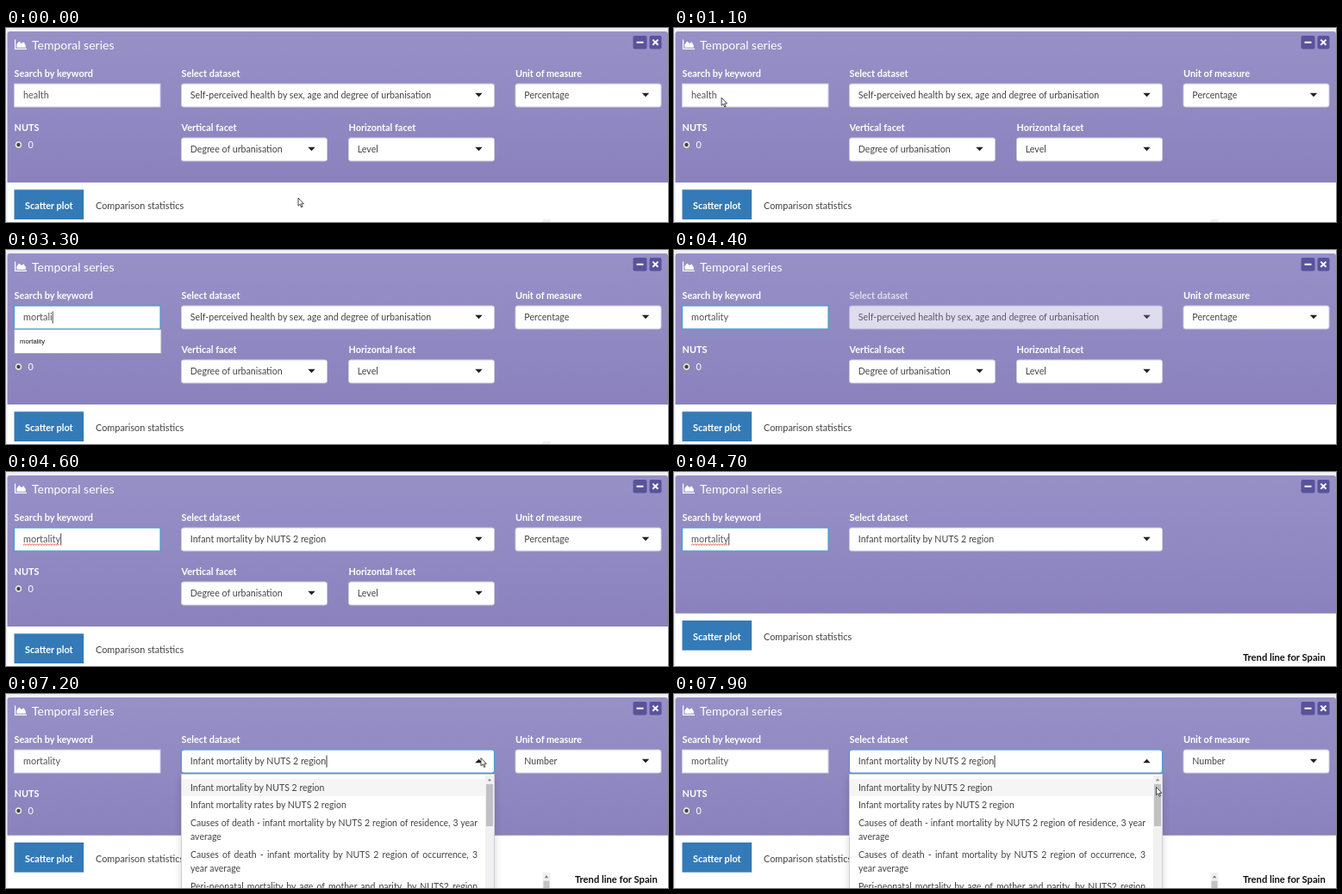
An HTML page that plays this animation: 768 px wide and 226 px high, repeating every 8 s.

```html
<!DOCTYPE html>
<html lang="en">
<head>
<meta charset="utf-8">
<title>Temporal series</title>
<style>
  html, body { margin: 0; width: 100%; height: 100%; overflow: hidden; background: #fff; }
  body { position: relative; }
  svg { position: absolute; left: 0; top: 0; width: 768px; height: 226px; overflow: hidden; }
  text { font: 10.9px Lato, "Open Sans", sans-serif; fill: #444; white-space: pre; }
  .label { fill: #fff; font-weight: 700; }
  .value { font-size: 10.65px; }
  .box { fill: #fff; stroke: #cdcbdc; }
  .focus { fill: #fff; stroke: #4b9bd3; stroke-width: 1.2; }
  .arrow { fill: #222; }
  #list {
    position: absolute; left: 203px; top: 93px; width: 364px; height: 140px;
    background: #fff; border: 1px solid #cfcfd6; box-sizing: border-box;
    box-shadow: 0 3px 8px rgba(0, 0, 0, .17);
    padding-top: 4.5px; color: #444;
    font: 10.5px/16.3px Lato, "Open Sans", sans-serif;
  }
  #list p { margin: 0; padding: 2.2px 19px 2.2px 10px; white-space: nowrap; }
  #list p:first-of-type { background: #f5f5f5; margin-right: 10px; }
  #list span { display: block; height: 16.3px; overflow: hidden; }
  #list .full { text-align: justify; text-align-last: justify; white-space: normal; }
  #list svg { left: auto; right: 0; top: 1px; width: 10px; height: 140px; }
</style>
</head>
<body>
<svg viewBox="0 0 768 226">
  <defs>
    <linearGradient id="purple" x1="0" y1="0" x2="0" y2="1">
      <stop offset="0" stop-color="#9790c7"/>
      <stop offset="1" stop-color="#8b82bd"/>
    </linearGradient>
  </defs>
  <rect width="768" height="20" fill="#eff0f6"/>
  <rect width="1.5" height="226" fill="#eeeef5"/>
  <path id="panel" fill="url(#purple)"/>

  <g fill="none" stroke="#fff">
    <path d="M10.6 13.5V24.4H24" stroke-width="1.2"/>
    <path d="M12.4 22.8V19L15.2 15.4L18 18L20.4 16.2L22.8 20V22.8Z" fill="#fff" stroke="none"/>
  </g>
  <text x="30" y="24.5" style="font-size:14px;fill:#fff">Temporal series</text>
  <rect x="727.5" y="9" width="16" height="15.5" rx="2" fill="#59529c"/>
  <rect x="746.5" y="9" width="14" height="15.5" rx="2" fill="#59529c"/>
  <path d="M731.5 16.8H739.5M750.3 13.6L756.5 19.8M756.5 13.6L750.3 19.8" stroke="#fff" stroke-width="2"/>

  <text class="label" x="9.5" y="57">Search by keyword</text>
  <rect id="search" x="9.5" y="65" width="169.5" height="27"/>
  <rect id="mark" x="20" y="71.5" height="14" fill="#3390f0"/>
  <text id="word" x="20" y="82.2"></text>
  <path id="wave" fill="none" stroke="#e0403c" stroke-width=".9"/>
  <path id="caret" stroke="#333" stroke-width=".9"/>

  <g id="nuts">
    <text class="label" x="9.5" y="120.2">NUTS</text>
    <circle cx="14.5" cy="136" r="4.4" fill="#e9e8ee" stroke="#77738c" stroke-width=".8"/>
    <circle cx="14.5" cy="136" r="2.2" fill="#444"/>
    <text x="25.5" y="140" style="fill:#fff">0</text>
  </g>
  <g id="hint">
    <rect x="9.5" y="92.5" width="170.5" height="28" fill="#fff" stroke="#a6a4b4"/>
    <text x="16" y="109" style="font:7.7px 'Liberation Sans',Arial,sans-serif;fill:#111">mortality</text>
  </g>
  <g id="fields"></g>

  <g id="lower">
    <rect x="9.5" y="188.3" width="80.7" height="34.7" fill="#337ab7"/>
    <text class="label" x="22" y="211">Scatter plot</text>
    <text x="104" y="211">Comparison statistics</text>
    <text id="trend" x="660" y="235" style="font-size:11.2px;font-weight:700;fill:#111">Trend line for Spain</text>
    <g id="bar">
      <rect x="622.5" y="223" width="9" height="30" fill="#f0f0f1"/>
      <path d="M624.8 229.5L627 226.5L629.2 229.5Z" fill="#777"/>
      <rect x="623.5" y="233" width="7" height="20" fill="#c3c3c5"/>
    </g>
  </g>
</svg>

<div id="list">
  <p>Infant mortality by NUTS 2 region</p>
  <p>Infant mortality rates by NUTS 2 region</p>
  <p><span class="full">Causes of death - infant mortality by NUTS 2 region of residence, 3 year</span>average</p>
  <p><span class="full">Causes of death - infant mortality by NUTS 2 region of occurrence, 3</span>year average</p>
  <p><span class="full">Peri-neonatal mortality by age of mother and parity, by NUTS2 region</span></p>
  <svg viewBox="0 0 10 140">
    <rect width="10" height="140" fill="#f1f1f2"/>
    <path d="M2.8 6.2L5 3.4L7.2 6.2Z" fill="#888"/>
    <rect x="1" y="10" width="8" height="49" fill="#c1c1c3"/>
  </svg>
</div>

<svg viewBox="0 0 768 226">
  <path id="pointer" d="M0 0V9.2L2.1 7.3L3.6 10.8L5 10.2L3.6 6.8H6.4Z" fill="#fff" stroke="#333" stroke-width=".9"/>
</svg>

<script>
const LOOP = 8000, TICK = 100;
const $ = id => document.getElementById(id);
const show = (id, on) => { $(id).style.display = on ? '' : 'none'; };

// id, label, x, top, width
const fields = [
  ['data', 'Select dataset', 203.5, 65, 363],
  ['unit', 'Unit of measure', 591, 65, 169],
  ['vert', 'Vertical facet', 203.5, 128, 169],
  ['horiz', 'Horizontal facet', 397.5, 128, 169]
];
$('fields').innerHTML = fields.map(([id, label, x, y, w]) => `
  <g id="${id}">
    <text class="label" x="${x}" y="${y - 8}">${label}</text>
    <rect id="${id}Box" class="box" x="${x}" y="${y}" width="${w}" height="27" rx="2.5"/>
    <text id="${id}Text" class="value" x="${x + 10.3}" y="${y + 17.2}"></text>
    <path id="${id}Arrow" class="arrow" d="M-4.2 -2.2H4.2L0 2.2Z"/>
  </g>`).join('') + '<path id="listCaret" stroke="#222" stroke-width=".9"/>';

const health = 'Self-perceived health by sex, age and degree of urbanisation';
const infant = 'Infant mortality by NUTS 2 region';
$('vertText').textContent = 'Degree of urbanisation';
$('horizText').textContent = 'Level';

const steps = [
  [0, { word: 'health', data: health, unit: 'Percentage', nuts: 1, facets: 1, bar: 1 }],
  [1300, { focus: 1, caret: 1, wave: 1 }],
  [1400, { mark: 1, caret: 0 }],
  [2500, { word: 'm', mark: 0, wave: 0, caret: 1, hint: 1 }],
  [2600, { word: 'mo' }],
  [2800, { word: 'mor' }],
  [2900, { word: 'mort' }],
  [3000, { word: 'morta' }],
  [3200, { word: 'mortal' }],
  [3300, { word: 'mortali' }],
  [3500, { word: 'mortalit' }],
  [3600, { word: 'mortality', hint: 0 }],
  [4100, { caret: 0 }],
  [4400, { dim: 1, bar: 0 }],
  [4500, { dim: 0, data: infant, wave: 1, caret: 1 }],
  [4700, { unit: '', nuts: 0, facets: 0, raised: 1 }],
  [4900, { unit: 'Number', nuts: 1 }],
  [5000, { caret: 0 }],
  [5400, { bar: 1 }],
  [5600, { caret: 1 }],
  [6800, { caret: 0, wave: 0 }],
  [7000, { focus: 0, open: 1 }]
];

// time, x, y
const moves = [[300, 339, 198], [1200, 45, 77], [5300, 58, 80], [6000, 420, 107.5], [6600, 551, 74.5], [7500, 551, 74.5], [7900, 559.5, 108.5]];

function pointerAt(t) {
  const i = moves.findIndex(m => m[0] > t);
  if (i < 0) return moves[moves.length - 1].slice(1);
  if (i === 0) return moves[0].slice(1);
  const [t0, x0, y0] = moves[i - 1], [t1, x1, y1] = moves[i];
  const p = (t - t0) / (t1 - t0), k = p * p * (3 - 2 * p);
  return [x0 + (x1 - x0) * k, y0 + (y1 - y0) * k];
}

function wavePath(w) {
  let d = 'M20 85.4';
  for (let x = 1.5, n = 0; x < w; x += 1.5, n++) d += `L${20 + x} ${n % 2 ? 85.4 : 84}`;
  return d;
}

function draw(t) {
  const s = Object.assign({}, ...steps.filter(e => e[0] <= t).map(e => e[1]));
  const bottom = s.raised ? 164.7 : 180;
  $('panel').setAttribute('d', `M1.5 ${bottom}V7Q1.5 4 4.5 4H765Q768 4 768 7V${bottom}Z`);
  $('lower').setAttribute('transform', `translate(0 ${s.raised ? -15.3 : 0})`);

  $('word').textContent = s.word;
  $('word').style.fill = s.mark ? '#fff' : '#555';
  const w = $('word').getComputedTextLength();
  $('mark').setAttribute('width', w);
  $('wave').setAttribute('d', wavePath(w));
  $('caret').setAttribute('d', `M${20.6 + w} 71.5V85.5`);
  $('search').setAttribute('class', s.focus ? 'focus' : 'box');

  $('dataText').textContent = s.data;
  $('unitText').textContent = s.unit;
  $('data').style.opacity = s.dim ? 0.7 : 1;
  $('dataBox').setAttribute('class', s.open ? 'focus' : 'box');
  for (const [id, , x, y, width] of fields) {
    const flip = id === 'data' && s.open ? -1 : 1;
    $(id + 'Arrow').setAttribute('transform', `translate(${x + width - 18} ${y + 13}) scale(1 ${flip})`);
  }
  $('listCaret').setAttribute('d', `M${214.6 + $('dataText').getComputedTextLength()} 71.5V85.5`);

  for (const id of ['mark', 'wave', 'caret', 'hint', 'nuts', 'unit', 'bar']) show(id, s[id]);
  show('vert', s.facets);
  show('horiz', s.facets);
  show('trend', s.raised);
  show('list', s.open);
  show('listCaret', s.open);

  show('pointer', t < 1300 || t >= 5400);
  $('pointer').setAttribute('transform', `translate(${pointerAt(t)})`);
}

const start = performance.now();
let last = -1;
function tick() {
  const t = Math.floor((performance.now() - start) % LOOP / TICK) * TICK;
  if (t !== last) draw(last = t);
  requestAnimationFrame(tick);
}
tick();
</script>
</body>
</html>
```
